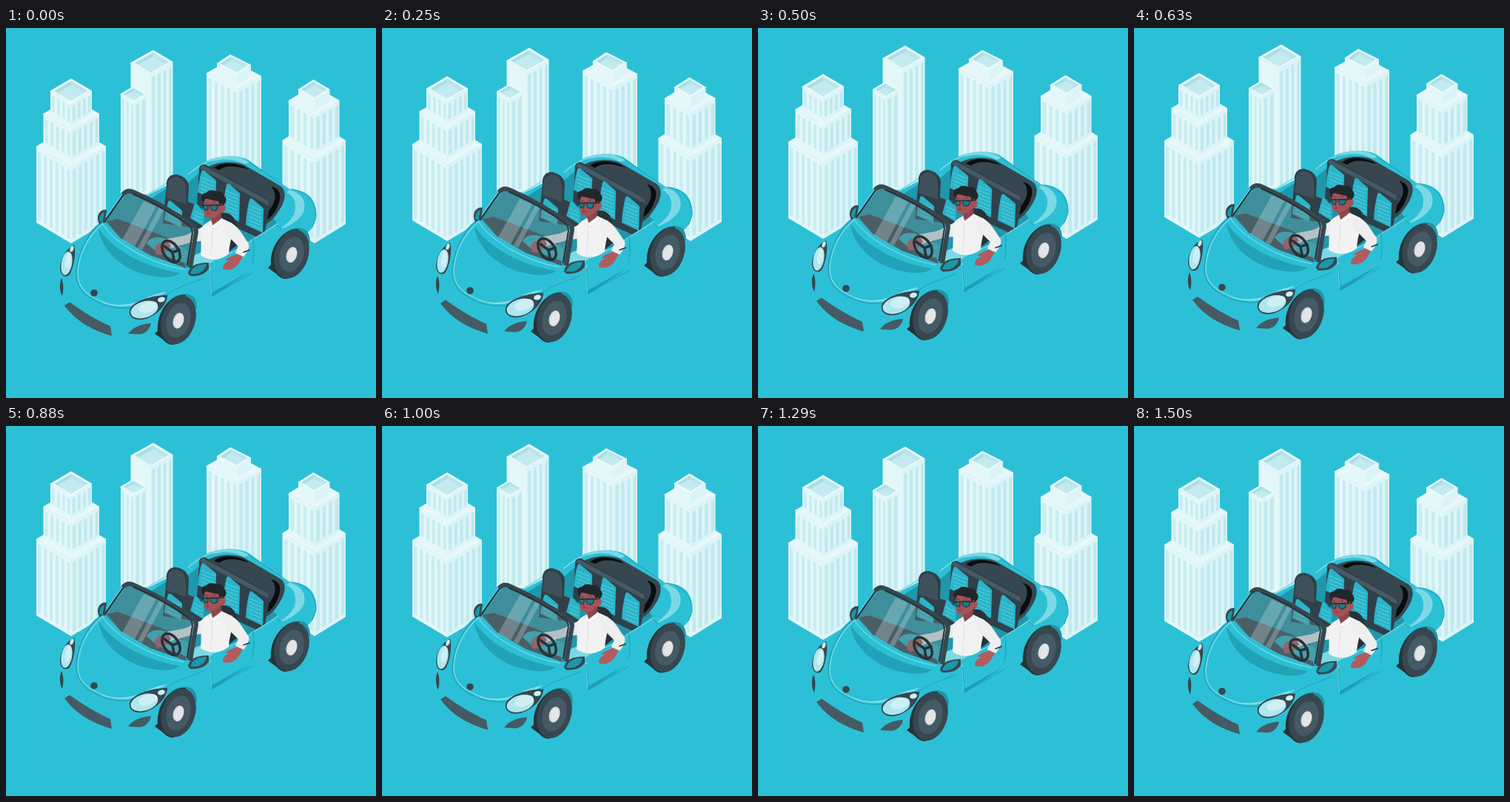
Recreate the animation shown at these times as an HTML page. Size 500 by 500 pixels, loop 1.54 s.

```html
<!DOCTYPE html>
<html lang="en">
<head>
<meta charset="utf-8">
<title>City drive</title>
<style>
html, body { margin: 0; width: 100%; height: 100%; overflow: hidden; background: #2cc0d6; }
svg { display: block; width: 100vw; height: 100vh; }
</style>
</head>
<body>
<svg viewBox="0 0 500 500" fill="none" stroke-linecap="round" stroke-linejoin="round">
<g id="scene">
  <g id="city"></g>

  <!-- body -->
  <path fill="#2cc0d6" d="M128 262C108 277 97 296 92 320L80 372L142 414L205 410L258 372L355 334L412 272C422 260 421 240 412 229C405 221 394 218 383 219L327 178C311 171 289 172 270 180C255 187 245 195 230 206L188 228Z"/>
  <path fill="#7bd9e6" d="M270 181C282 175 292 173.500 302 173.500C314 174 322 177 329 182L322 184C313 179 304 177 294 177.500Z"/>
  <path stroke="#7bd9e6" stroke-width="1.600" d="M190 226L217 210M246 198C254 191 264 184 274 180"/>
  <path stroke="#1e9eb2" stroke-width="1" d="M328 181L383 218C405 218 420 236 419 256L414 269"/>
  <path fill="#7bd9e6" d="M383 219C401 222 408 238 401 251C394 262 380 269 368 273C382 263 391 255 391 242C391 232 387 226 379 222Z"/>

  <!-- cabin -->
  <path fill="#1f98ab" d="M134 262L166 220L192 233L222 214L246 209L266 192L352 245L366 263L330 290L266 320L243 324L195 307L155 284Z"/>
  <path fill="#37474f" d="M272 188C285 181 304 179 320 184L370 213C380 219 378 233 370 245C364 255 358 262 348 267L340 236Z"/>
  <path fill="#090d0f" d="M281 189C290 182 305 180.500 323 188L328 191.500C313 187 298 184 288 192ZM358 214C371 217 373 227 368 238C365 247 360 254 353 259L353 249C364 238 368 224 358 214Z"/>
  <path fill="#30404a" d="M261 191C261 185 266 183 272 186L350 229C357 233 358 238 356 244L350 275L338 282L316 272L258 238Z"/>
  <path fill="#455a64" d="M265 185L354 233L356 240L351 238L262 190Z"/>
  <path fill="#30404a" d="M217 213C216 203 222 197 231 198C240 200 247 206 247 214L246 235L265 242L266 272L212 264L215 232Z"/>
  <path fill="#3e5059" d="M219 209C223 199 236 199 241 209C244 215 243 226 243 238L217 229Z"/>
  <g id="seats"></g>
  <path fill="#263238" d="M292 250C302 248 309 255 311 264L314 292L300 303Z"/>
  <path fill="#37474f" d="M136 261L151 258L207 279L237 292L243 324L195 307L155 284Z"/>
  <path fill="#29b3c8" d="M190 291C194 282 208 280 220 287L246 300L243 318L205 304Z"/>

  <!-- sill and door -->
  <path fill="#7bd9e6" d="M252 308L264 303L283 311L273 322L251 323Z"/>
  <path fill="#2cc0d6" d="M275 318C292 310 314 301 331 288L368 265L375 273L333 328L279 361Z"/>
  <path stroke="#7bd9e6" stroke-width="1.300" d="M274 317C294 308 317 299 333 286L367 265M276 324L278 359"/>
  <path stroke="#1e9eb2" stroke-width="1" d="M276.500 328L279 362L333 331M333 282C336 292 335 310 333 320M365 266L372 272"/>
  <path fill="#1e9eb2" d="M279 357L331 328L279 363Z"/>

  <!-- driver -->
  <path fill="#e2ecee" d="M271 267C261 270 250 278 239 281L218 285L214 293L221 298L249 290L269 287Z"/>
  <path fill="#a85459" d="M219 288L206 291C200 295 200 304 205 307L216 303L223 295Z"/>
  <path fill="#f2f2f2" d="M277 260L291 257L306 264C309 275 302 287 301 305C290 315 273 315 263 307C264 297 264 284 262 274C264 268 269 264 277 260Z"/>
  <path fill="#8f454c" d="M276 251L291 247L290 260L279 267L277 263Z"/>
  <path fill="#f8f8f8" stroke="#d5dcdf" stroke-width=".7" d="M277 260L279 267L291 258L294 263L281 272L274 266Z"/>
  <path stroke="#d9e0e2" stroke-width=".8" d="M279 270L277 309"/>
  <path fill="#b25b5d" d="M316 304C309 307 300 309 296 314L302 314C296 317 292 321 293 326C301 329 310 325 314 319L321 307Z"/>
  <path fill="#efefef" stroke="#d8dfe1" stroke-width=".5" d="M299 262C313 265 318 278 327 290C330 295 327 302 321 309L310 304L314 295L303 284C296 277 294 267 299 262Z"/>
  <path fill="#a35257" d="M268 233C267 242 266 252 270 255C276 259 285 257 289 250C297 250 299 241 294 238L291 229L271 229Z"/>
  <path fill="#20272b" d="M267 236C262 231 264 222 270 223C274 218 281 219 284 221C291 219 294 224 295 227C299 231 298 236 294 239L291 237L289 241L287 234C280 234 273 230 269 231Z"/>
  <path stroke="#263238" stroke-width="1.300" d="M284 240L294 239M266 239.500L286 239"/>
  <path fill="#167d8e" stroke="#263238" stroke-width="1.100" d="M266 240L273 240C274 245 271 247 268 245ZM276 240L286 239.500C287 245 283 248 279 246C277 245 276 243 276 240Z"/>
  <path stroke="#6d3038" stroke-width=".9" d="M269 236L272 236.500M279 236L283 235.500M271 251L275 251M273 245L272 248"/>

  <!-- windscreen -->
  <path fill="#6d7f86" fill-opacity=".4" d="M134 262L164 222L210 242L256 271L245 324L195 307L155 284Z"/>
  <path fill="#d4e6e8" fill-opacity=".28" d="M186 234L203 241L174 295L157 286ZM207 243L213 246L184 300L178 297Z"/>

  <!-- steering wheel -->
  <ellipse cx="223" cy="302" rx="10" ry="16" transform="rotate(-34 223 302)" stroke="#263238" stroke-width="3.500"/>
  <path stroke="#263238" stroke-width="3.500" d="M214 295L225 303L234 300M225 303L227 314"/>

  <path stroke="#263238" stroke-width="2.200" d="M133 262L159 225"/>
  <path stroke="#7bd9e6" stroke-width=".9" d="M132 260L157 225"/>
  <path stroke="#37474f" stroke-width="6" stroke-linecap="butt" d="M158 225C162 220 167 219 173 222Q214 240 250 265C257 269 258 273 256 281L249 324"/>
  <path stroke="#263238" stroke-width="2" d="M172 224.500Q213 242 246 266C252 270 253 275 251 283L245 320"/>
  <path fill="#37474f" d="M124 259C123 250 130 244 136 246L134 261L126 266Z"/>
  <path fill="#1d96a9" d="M126 260C126 253 130 249 133 249L130 264Z"/>

  <!-- bonnet -->
  <path stroke="#7bd9e6" stroke-width="1.200" d="M130 264C146 290 195 319 240 326"/>
  <path fill="#22a2b6" d="M125 270C142 299 188 324 235 331C229 338 206 339 184 332C153 322 128 299 125 270Z"/>
  <path stroke="#1e9eb2" stroke-width="1.100" d="M128 264C107 281 96 307 95 332C95 354 110 367 139 376C167 383 192 375 214 362"/>
  <path stroke="#84dde9" stroke-width="1.200" d="M130 265C110 282 98 307 97 332C97 352 111 364 139 373C164 380 183 369 204 360L214 358"/>
  <path fill="#84dde9" d="M126 370C154 378 174 373 191 364C202 359 210 358 217 356C213 361 202 362 194 366C174 377 152 380 126 370Z"/>
  <path stroke="#1e9eb2" stroke-width=".9" d="M217 361C232 349 247 347 267 338"/>
  <circle cx="119" cy="358" r="4.800" fill="#37474f"/>
  <path fill="#455a64" d="M79 375L86 370.500C102 382 121 394 141 403L143 416C118 409 95 397 79 375Z"/>
  <path fill="#37474f" d="M75 338C78 344 78 354 76 362C72 356 72 344 75 338Z"/>
  <path fill="#455a64" d="M165 413C171 405 181 400 196 399C195 406 189 413 181 414Z"/>

  <!-- headlights -->
  <path fill="#37474f" d="M92 293C95 302 92 323 86 333C80 339 73 334 73 323C74 310 82 298 92 293Z"/>
  <ellipse cx="82" cy="318" rx="7.300" ry="16" transform="rotate(10 82 318)" fill="#aee6ef"/>
  <ellipse cx="84" cy="315" rx="4" ry="11" transform="rotate(10 84 315)" fill="#cdf0f5"/>
  <ellipse cx="89" cy="298.500" rx="2.300" ry="4.200" transform="rotate(20 89 298.500)" fill="#c9f0f5"/>
  <path fill="#37474f" d="M218 361C218 374 204 388 189 393C175 397 165 391 167 381C170 370 195 361 218 361Z"/>
  <ellipse cx="187" cy="380.500" rx="19" ry="11" transform="rotate(-17 187 380.500)" fill="#aee6ef"/>
  <ellipse cx="192" cy="377" rx="13" ry="7" transform="rotate(-17 192 377)" fill="#cdf0f5"/>
  <ellipse cx="210" cy="367" rx="5" ry="3.400" transform="rotate(-15 210 367)" fill="#c9f0f5"/>

  <!-- mirror and handle -->
  <path fill="#37474f" d="M246 332C247 322 257 317 274 317L274 325C270 333 259 336 249 335Z"/>
  <path fill="#1d96a9" d="M249 332C251 323 260 319 271 319C270 328 260 334 249 332Z"/>
  <path stroke="#263238" stroke-width="1.600" d="M321 303L329 300"/>
  <g id="wheels"></g>
</g>
</svg>
<script>
const $ = id => document.getElementById(id);
const LOOP = 1540, STEPS = 37, TOP = 17.5, LOW = 36, RISE = 9.3;

const mix = (a, b, k) => a.map((v, i) => v + (b[i] - v) * k);
const drop = ([x, y], d) => [x, y + d];
const poly = (pts, fill, extra = '') =>
  `<polygon points="${pts.map(p => p.map(v => v.toFixed(1))).join(' ')}" fill="${fill}" ${extra}/>`;

function face(a, b, h, n, base, pane) {
  let s = poly([a, b, drop(b, h), drop(a, h)], base);
  const end = Math.min(5, h * .15);
  for (let i = 0; i < n; i++) {
    const p = mix(a, b, (i + .3) / n), q = mix(a, b, (i + .82) / n);
    s += poly([drop(p, end), drop(q, end), drop(q, h - end), drop(p, h - end)], pane);
  }
  return s;
}

// left, front and right roof corners, height, panes per side
function block(l, f, r, h, nl, nr, hollow) {
  const back = [l[0] + r[0] - f[0], l[1] + r[1] - f[1]];
  const roof = [l, back, r, f];
  let s = face(l, f, h, nl, '#e4f7f9', '#c8edf1') + face(f, r, h, nr, '#dcf4f7', '#bfe9ee');
  s += poly(roof, '#e8f8fa', 'stroke="#f8fdfd" stroke-width=".5"');
  if (hollow) {
    const mid = mix(l, r, .5);
    const [a, b, c, d] = roof.map(p => mix(mid, p, .8));
    s += poly([a, b, c, d], '#a9dee5');
    s += poly([b, c, mix(c, d, .2), drop(b, 5)], '#b7e5eb');
    s += poly([mix(a, d, .2), drop(b, 5), mix(c, d, .2), d], '#c3ebef');
  }
  return s;
}

$('city').innerHTML = [
  block([41, 160], [88, 188], [135, 160], 103, 6, 6),
  block([50.5, 116], [88, 138], [126, 116], 42, 5, 5),
  block([60, 85], [88, 101.5], [116, 85], 31, 4, 4, true),
  block([168.5, 47], [195, 63], [225.5, 46], 165, 0, 4, true),
  block([155, 89], [173, 99.5], [190, 89.5], 134, 3, 2, true),
  block([271, 61], [313, 83], [345, 65], 130, 5, 4),
  block([285, 48], [313, 62], [331, 50], 14.5, 0, 0, true),
  block([373.5, 152], [417, 178], [459, 152], 113, 5, 5),
  block([382, 98], [417, 118], [450.5, 98], 53, 4, 4),
  block([395, 83], [417, 96], [437.5, 83], 15, 0, 0, true)
].join('');

// padded panel with ribs
function seat(x, y, w, h) {
  let s = `<path fill="#2ab4c9" d="M${x + 3} ${y}q1-3 4-1L${x + w - 2} ${y + w * .45}q3 2 2 6L${x + w - 1} ${y + h + 7}L${x - 2} ${y + h - 4}Q${x - 1} ${y + 15} ${x + 3} ${y}Z"/>`;
  for (let k = 10; k < h; k += 5)
    s += `<path stroke="#7bd9e6" stroke-width=".7" d="M${x + 3} ${y + k - 2}q${w * .4} 4 ${w - 6} ${w * .3}"/>`;
  return s;
}
$('seats').innerHTML = seat(261, 194, 23, 32) + seat(295, 212, 21, 43) +
  seat(326, 232, 22, 38) + seat(216, 235, 22, 28) + seat(251, 239, 17, 22);

const oval = (x, y, rx, ry, fill) =>
  `<ellipse cx="${x}" cy="${y}" rx="${rx}" ry="${ry}" transform="rotate(17 ${x} ${y})" fill="${fill}"/>`;
const wheel = (x, y) =>
  `<path fill="#1d96a9" d="M${x - 26} ${y + 4}C${x - 22} ${y - 26} ${x} ${y - 41} ${x + 17} ${y - 34}Q${x + 25} ${y - 30} ${x + 25} ${y - 16}L${x} ${y}Z"/>` +
  `<path fill="#263238" d="M${x - 32} ${y + 18}l4-4C${x - 30} ${y - 14} ${x - 8} ${y - 37} ${x + 10} ${y - 34}L${x - 6} ${y + 33}q-8 1-15-7Z"/>` +
  oval(x, y - .5, 22.7, 33.7, '#37474f') + oval(x, y, 16, 24, '#455a64') +
  oval(x, y + .5, 7.2, 11, '#cfd3d5') + oval(x + .5, y + .5, 6, 9.8, '#e4e5e5');
$('wheels').innerHTML = wheel(233, 395) + wheel(386, 306);

// steady climb, steady fall
function lift(n) {
  const up = (n + STEPS - LOW) / (TOP + STEPS - LOW);
  const down = (LOW - n) / (LOW - TOP);
  return RISE * Math.min(up, down);
}

function draw(now) {
  const n = Math.floor(now % LOOP / LOOP * STEPS + .06) % STEPS;
  $('scene').setAttribute('transform', `translate(0 ${(lift(0) - lift(n)).toFixed(2)})`);
  requestAnimationFrame(draw);
}
draw(0);
</script>
</body>
</html>
```
